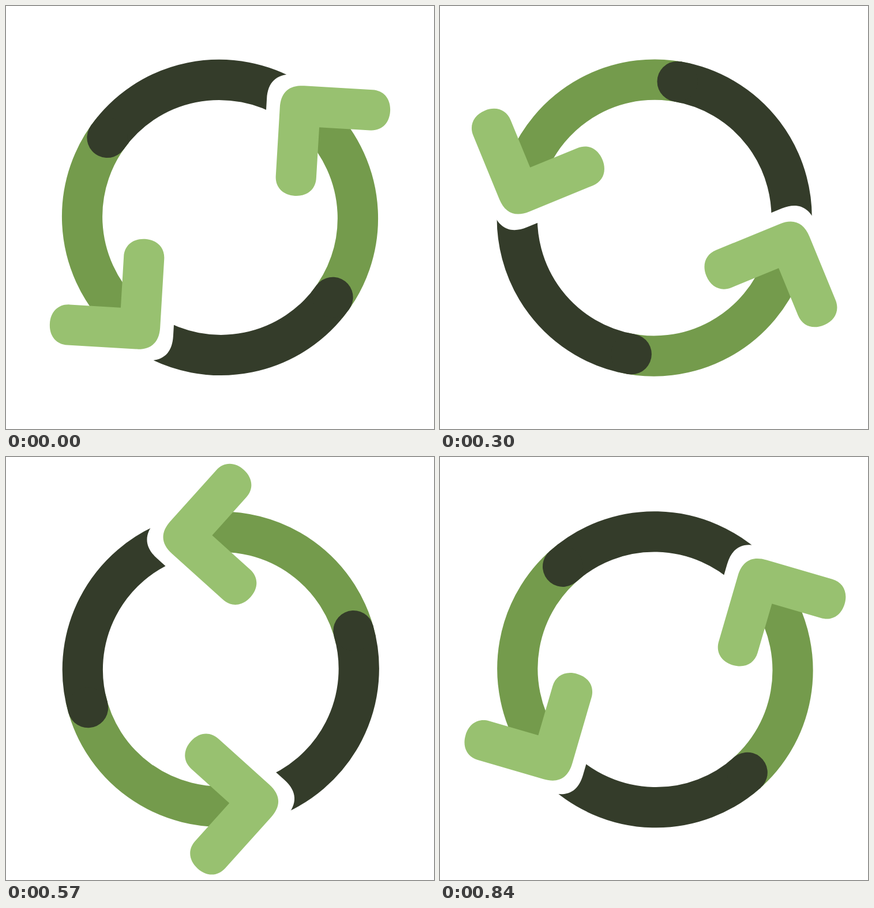
Animation, 742 px wide and 733 px high, one loop 0.87 s. Source, as an HTML page:

```html
<!DOCTYPE html>
<html lang="en">
<head>
<meta charset="utf-8">
<title>Turning arrows</title>
<style>
  html, body { margin: 0; width: 100%; height: 100%; overflow: hidden; background: #fff; }
  svg { display: block; }
  .band { fill: none; stroke-width: 70.2; }
</style>
</head>
<body>
<svg width="742" height="733" viewBox="0 0 742 733">
  <g id="wheel">
    <path class="band" stroke="#749b4c"
      d="M159.3 -176.9A239.6 238 35 0 1 193.8 140.8M-159.3 176.9A239.6 238 35 0 1 -193.8 -140.8"/>
    <g id="half">
      <path class="band" stroke="#343c2a" d="M-203.4 -126.6A239.6 238 35 0 1 111.7 -210.1"/>
      <circle cx="-203.4" cy="-126.6" r="35.1" fill="#343c2a"/>
      <g transform="translate(92.3 -236.4)">
        <path fill="#fff" d="M-23.5 71V26C-23.5 -3.7 -8.2 -18.9 21.5 -18.9H66V71Z"/>
        <path fill="#98c170" d="M0 40C0 13.6 13.6 0 40 0H158.8c19.5 0 32.5 14 32.5 35.1s-13 35.1 -32.5 35.1H70.2V158.8c0 19.5 -14 32.5 -35.1 32.5S0 178.3 0 158.8Z"/>
      </g>
    </g>
    <use href="#half" transform="rotate(180)"/>
  </g>
</svg>
<script>
  const STEP = 30, STEPS = 29, FIRST_QUARTER = 8, QUARTER = 7;
  const wheel = document.getElementById('wheel');

  function draw(now) {
    const step = Math.floor(now / STEP) % STEPS;
    // The first quarter turn takes one step more than the others.
    const quarters = step < FIRST_QUARTER
      ? step / FIRST_QUARTER
      : 1 + (step - FIRST_QUARTER) / QUARTER;
    const drift = 1.9 * step / (STEPS - 1);
    wheel.setAttribute('transform',
      `translate(${371 + drift} ${366.4 + drift}) rotate(${3.4 - 90 * quarters})`);
  }

  const start = performance.now();
  function tick() {
    draw(performance.now() - start);
    requestAnimationFrame(tick);
  }
  tick();
</script>
</body>
</html>
```
